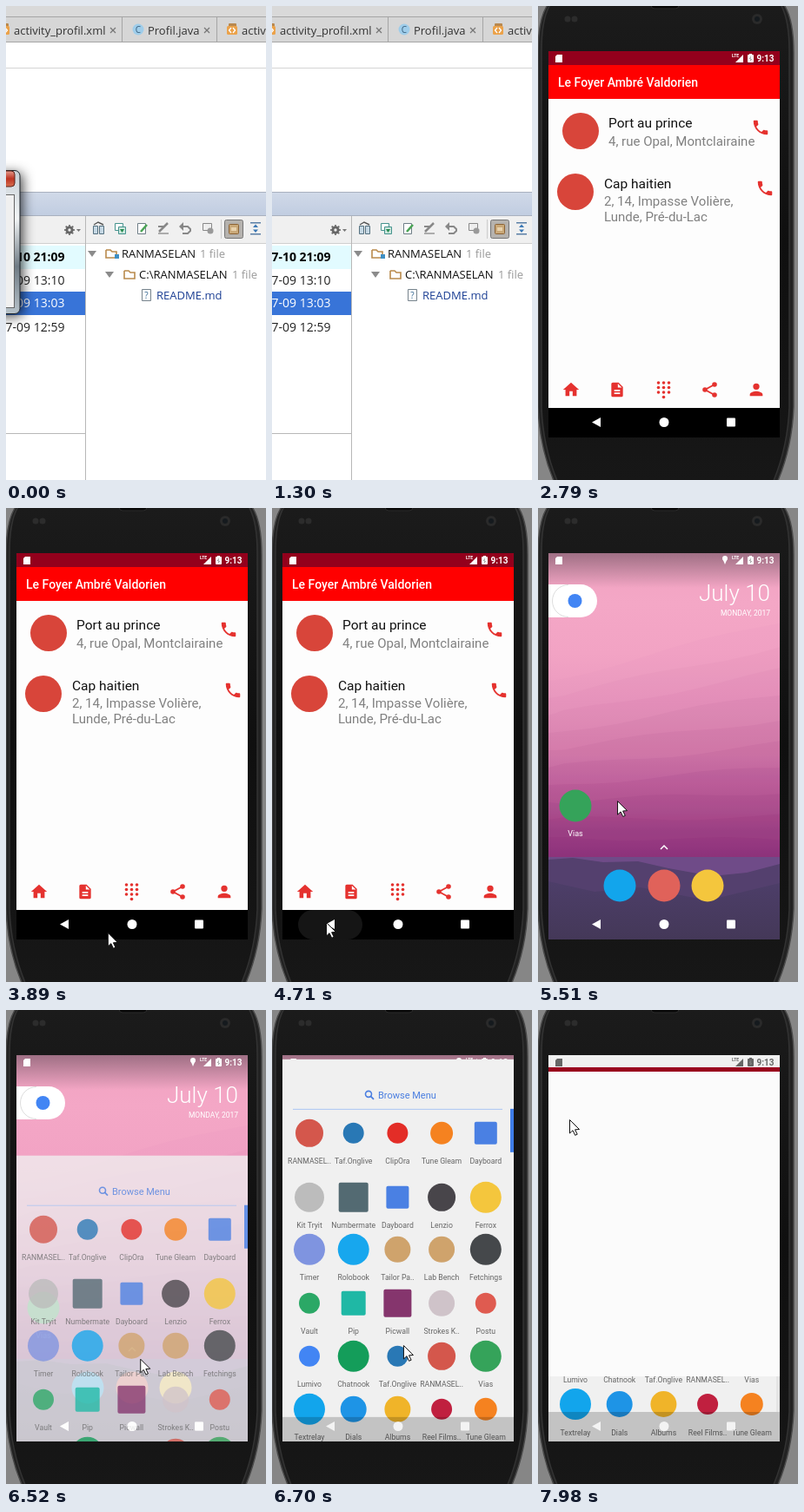
These frames come from a looping animation (299 px wide and 546 px high, 8 s). An HTML page with a canvas:

```html
<!DOCTYPE html>
<html lang="en">
<head>
<meta charset="utf-8">
<title>Screen recording</title>
<style>
  html, body { margin: 0; width: 100%; height: 100%; overflow: hidden; background: #fff; }
  canvas { display: block; }
</style>
</head>
<body>
<canvas id="stage" width="299" height="546"></canvas>
<script>
const g = document.getElementById('stage').getContext('2d');
const LOOP = 8000, STEP = 90.2;
const UI = '"Open Sans", "Noto Sans", sans-serif', MOBILE = 'Roboto, sans-serif';

// ---------- drawing helpers ----------
const rect = (x, y, w, h, c) => { g.fillStyle = c; g.fillRect(x, y, w, h); };
function disc(x, y, r, c) {
  g.fillStyle = c; g.beginPath(); g.arc(x, y, r, 0, 7); g.fill();
}
function round(x, y, w, h, r, fill, stroke) {
  g.beginPath(); g.roundRect(x, y, w, h, r);
  if (fill) { g.fillStyle = fill; g.fill(); }
  if (stroke) { g.strokeStyle = stroke; g.lineWidth = 1; g.stroke(); }
}
function trace(points) {
  g.beginPath();
  for (let i = 0; i < points.length; i += 2) g.lineTo(points[i], points[i + 1]);
}
function poly(points, c) { trace(points); g.fillStyle = c; g.fill(); }
function line(points, c, w = 1) { trace(points); g.strokeStyle = c; g.lineWidth = w; g.stroke(); }
function text(s, x, y, size, c, { font = MOBILE, weight = 400, align = 'left' } = {}) {
  g.font = `${weight} ${size}px ${font}`;
  g.textAlign = align; g.fillStyle = c; g.fillText(s, x, y);
}
function blend(x0, y0, x1, y1, ...colors) {
  const gr = g.createLinearGradient(x0, y0, x1, y1);
  colors.forEach((c, i) => gr.addColorStop(i / (colors.length - 1), c));
  return gr;
}
function layer(draw, { alpha = 1, x = 0, y = 0, scale = 1 } = {}) {
  g.save(); g.globalAlpha *= alpha; g.translate(x, y); g.scale(scale, scale);
  draw(); g.restore();
}
// Linear interpolation between rows of [time, ...values].
function track(t, rows) {
  const i = rows.findIndex(r => r[0] > t);
  if (i === 0) return rows[0].slice(1);
  if (i < 0) return rows[rows.length - 1].slice(1);
  const [a, b] = [rows[i - 1], rows[i]], p = (t - a[0]) / (b[0] - a[0]);
  return a.slice(1).map((v, k) => v + (b[k + 1] - v) * p);
}

const GLYPHS = {
  home: 'M10 20v-6h4v6h5v-8h3L12 3 2 12h3v8z',
  page: 'M14 2H6a2 2 0 0 0-2 2v16a2 2 0 0 0 2 2h12a2 2 0 0 0 2-2V8zM16 18H8v-2h8zM16 14H8v-2h8zM13 9V3.5L18.5 9z',
  person: 'M12 12a4 4 0 1 0 0-8 4 4 0 0 0 0 8zM12 14c-2.7 0-8 1.3-8 4v2h16v-2c0-2.7-5.3-4-8-4z',
  call: 'M6.6 10.8c1.4 2.8 3.8 5.1 6.6 6.6l2.2-2.2c.3-.3.7-.4 1-.2 1.1.4 2.3.6 3.6.6.6 0 1 .4 1 1V20c0 .6-.4 1-1 1C10.6 21 3 13.4 3 4c0-.6.4-1 1-1h3.5c.6 0 1 .4 1 1 0 1.2.2 2.4.6 3.6.1.3 0 .7-.2 1z'
};
for (const k in GLYPHS) GLYPHS[k] = new Path2D(GLYPHS[k]);
function glyph(name, x, y, size, c) {
  layer(() => { g.fillStyle = c; g.fill(GLYPHS[name], 'evenodd'); },
    { x: x - size / 2, y: y - size / 2, scale: size / 24 });
}
function cursor([x, y]) {
  layer(() => {
    const arrow = [.5, .5, .5, 16, 4, 12.7, 6.7, 18.3, 9.2, 17.2, 6.6, 11.8, 11.5, 11.5, .5, .5];
    poly(arrow, '#fff'); line(arrow, '#111');
  }, { x, y });
}

// ---------- desktop editor ----------
function folder(x, y) {
  line([x - 6, y - 4, x - 1, y - 4, x + 1, y - 2, x + 6, y - 2, x + 6, y + 5, x - 6, y + 5, x - 6, y - 4], '#b98a4c', 1.6);
}
function tab(x, w, label, labelX, isClass) {
  rect(x, 13, w, 28, '#d6d6d6');
  rect(x + w, 13, 1, 28, '#a5a5a5');
  if (isClass) {
    disc(labelX - 11, 27, 6.5, '#9fcdea');
    text('C', labelX - 11, 31, 10, '#3a617f', { font: UI, align: 'center' });
  } else {
    const left = labelX - 17;
    round(left + 2, 20, 9, 4, 1, '#b9884d');
    round(left, 23, 12, 10, 1.5, '#eba24a');
    line([left + 5, 25, left + 2.5, 28, left + 5, 31], '#fff', 1.3);
    line([left + 7, 25, left + 9.5, 28, left + 7, 31], '#fff', 1.3);
  }
  text(label, labelX, 33, 13, '#333', { font: UI });
}
function closeMark(x) {
  line([x - 3, 25, x + 3, 31], '#777', 1.3);
  line([x + 3, 25, x - 3, 31], '#777', 1.3);
}
function toolbar() {
  disc(73, 258, 4.5, '#666'); disc(73, 258, 1.7, '#eee');
  for (let i = 0; i < 8; i++) {
    const a = i * Math.PI / 4;
    disc(73 + 5 * Math.cos(a), 258 + 5 * Math.sin(a), 1.1, '#666');
  }
  poly([81, 257, 86, 257, 83.5, 260], '#777');
  round(100.5, 253.5, 5, 9, 0, '#c6d8e4', '#55707f');
  round(107.5, 253.5, 5, 9, 0, '#c6d8e4', '#55707f');
  line([101, 252, 106, 249, 112, 252], '#555', 1.4);
  round(125.5, 250.5, 9, 8, 0, '#fff', '#45938d');
  round(129.5, 254.5, 8, 8, 0, '#cde7de', '#45938d');
  poly([131, 257, 136, 257, 133.5, 261], '#258b4f');
  round(151.5, 250.5, 9, 12, 0, '#fff', '#6f7e87');
  line([155, 260, 162, 252], '#49a354', 2.5);
  line([176, 260, 186, 250], '#888', 2.5); line([175, 254, 181, 254], '#888', 2);
  line([175, 262, 187, 262], '#888', 1.3);
  line([202, 254, 209, 254, 212, 257, 212, 259, 209, 262, 203, 262], '#888', 2);
  poly([199, 254, 204, 249, 204, 259], '#888');
  round(226.5, 250.5, 10, 8, 0, '#eee', '#888'); disc(235, 259, 3.5, '#999');
  rect(247, 246, 1, 22, '#ccc');
  round(251.5, 246.5, 21, 21, 2, '#b5b2ae', '#757575');
  round(256.5, 251.5, 11, 11, 1, '#c9a878', '#8a6235');
  rect(259, 255, 6, 4, '#e8d2ad');
  rect(281, 249, 12, 1.5, '#5a7fa6'); rect(281, 262, 12, 1.5, '#5a7fa6');
  poly([284, 255, 290, 255, 287, 251.5], '#3b78b5');
  poly([284, 257.5, 290, 257.5, 287, 261], '#3b78b5');
}
function logRow(y, label, bg, c, weight) {
  rect(0, y, 91, 27, bg);
  text(label, 67.5, y + 18, 14, c, { font: UI, weight, align: 'right' });
}
function tree() {
  const entry = (s, x, y, c) => text(s, x, y, 13, c, { font: UI });
  poly([94, 282, 104, 282, 99, 289], '#8b8b8b'); folder(121, 285); rect(125, 286, 5, 5, '#3f8fc4');
  entry('RANMASELAN', 133, 290, '#111'); entry('1 file', 223, 290, '#999');
  poly([114, 306, 124, 306, 119, 313], '#8b8b8b'); folder(142, 309);
  entry('C:\\RANMASELAN', 153, 314, '#111'); entry('1 file', 260, 314, '#999');
  round(156.5, 326.5, 10, 13, 0, '#fff', '#76838c');
  text('?', 161.5, 337, 10, '#3a6b94', { font: UI, align: 'center' });
  entry('README.md', 173, 338, '#1c3f94');
}
function dialog() {
  g.save();
  g.shadowColor = 'rgba(0,0,0,.75)'; g.shadowBlur = 14; g.shadowOffsetY = 3; g.shadowOffsetX = 3;
  round(-40, 189.5, 56, 165, 6, '#aab4bd');
  g.restore();
  round(-40, 189.5, 56, 165, 6, blend(0, 190, 0, 355, '#c8d0d6', '#f2f5f6', '#6f7b85', '#b8c3ca'), '#20272c');
  round(-20, 190, 30, 18, 4, blend(0, 190, 0, 208, '#e49a8c', '#bd3423', '#d76f50'), '#5b2119');
  rect(-1, 217, 11, 131, '#666'); rect(0, 218, 9, 129, '#f0f0f0');
}
function editor(t, s) {
  rect(0, 0, 299, 546, '#fff');
  rect(0, 0, 299, 13, '#d9d9d9'); rect(0, 12, 299, 30, '#a5a5a5');
  tab(0, 133, 'activity_profil.xml', 9); closeMark(123);
  tab(134, 108, 'Profil.java', 163, true); closeMark(231);
  tab(243, 60, 'activity_main.xml', 271);
  rect(0, 71, 299, 1, '#d4d4d4');
  rect(0, 214, 299, 28, '#a9b1bf');
  rect(0, 215, 299, 26, blend(0, 215, 0, 241, '#d0d9e8', '#c1cde1'));
  rect(0, 242, 299, 31, '#f0f0f0'); rect(0, 273, 299, 1, '#cfcfcf');
  toolbar();
  logRow(276, '2017-07-10 21:09', '#e2fbff', '#000', 700);
  logRow(303, '2017-07-09 13:10', '#fff', '#222');
  logRow(329, '2017-07-09 13:03', '#3874d8', '#fff');
  logRow(357, '2017-07-09 12:59', '#fff', '#222');
  rect(0, 492, 91, 1, '#b8b8b8'); rect(91, 242, 1, 304, '#b8b8b8');
  tree();
  if (t < 670) {
    const p = t < 500 ? 0 : t < 590 ? 1 : 2;
    layer(dialog, { alpha: [1, .6, .2][p], x: -2 * p, y: 5 * p, scale: 1 - .02 * p });
  }
  if (t >= 850 && t < 1300) cursor(track(s, [[850, 68, 368], [1020, 87, 438], [1170, 87, 438], [1210, 78, 440]]));
}

// ---------- handset ----------
function shell(left, right, top, fill, stroke) {
  g.beginPath();
  g.moveTo(left + 13, top);
  g.quadraticCurveTo(left, top + 16, left, top + 58);
  g.lineTo(left, 462);
  g.quadraticCurveTo(left + 2, 515, left + 24, 560);
  g.lineTo(right - 24, 560);
  g.quadraticCurveTo(right - 2, 515, right, 462);
  g.lineTo(right, top + 58);
  g.quadraticCurveTo(right, top + 16, right - 13, top);
  g.fillStyle = fill; g.fill();
  g.strokeStyle = stroke; g.lineWidth = 1.5; g.stroke();
}
function handset() {
  rect(0, 0, 299, 546, '#868686');
  shell(0, 294, -4, '#222', '#4a4a4a');
  shell(4, 289, -6, blend(0, 0, 0, 546, '#1b1b1b', '#0f0f0f', '#171717'), '#333');
  round(130, -6, 32, 9, 4, '#080808', '#2a2a2a');
  disc(34, 15, 3.5, '#2c2c2c'); disc(42, 15, 3.5, '#2c2c2c');
  disc(252, 15, 6, '#2a2a2a'); disc(252, 15, 3, '#151a1e');
}
function statusBar(c, pin) {
  poly([22, 56, 28, 56, 28, 65, 20, 65, 20, 58], c);
  text('LTE', 223, 59, 5, c, { weight: 700 });
  poly([236, 56, 236, 65, 227, 65], c);
  round(241, 56, 7, 9, 1, c); rect(243, 55, 3, 2, c);
  poly([245, 57, 243, 61, 246, 61, 244, 64], '#888');
  text('9:13', 271.5, 64, 10, c, { weight: 700, align: 'right' });
  if (pin) { disc(215, 58, 3, c); poly([212.5, 59, 217.5, 59, 215, 65], c); }
}
function navKeys(c = '#fff') {
  poly([62, 479.5, 72, 474, 72, 485], c);
  disc(145, 479.5, 5.5, c);
  round(217, 474.5, 10, 10, 1, c);
}
function contactApp(t) {
  const red = '#e5322f';
  rect(12, 52, 266, 445, '#fdfdfd');
  rect(12, 52, 266, 16, '#93001c'); rect(12, 68, 266, 39, '#f00');
  statusBar('#fff');
  text('Le Foyer Ambré Valdorien', 23, 93, 14, '#fff', { weight: 500 });
  disc(49, 144, 21, '#d8453a'); disc(43, 214, 21, '#d8453a');
  text('Port au prince', 81, 140, 15.5, '#111');
  text('4, rue Opal, Montclairaine', 81, 161, 15, '#808080');
  text('Cap haitien', 76, 210, 15.5, '#111');
  text('2, 14, Impasse Volière,', 76, 230, 15, '#808080');
  text('Lunde, Pré-du-Lac', 76, 248, 15, '#808080');
  glyph('call', 256, 140, 22, red); glyph('call', 261, 210, 22, red);
  glyph('home', 38, 442, 22, red); glyph('page', 91, 442, 20, red); glyph('person', 251, 442, 22, red);
  for (let i = 0; i < 9; i++) disc(138.5 + i % 3 * 6, 434 + (i / 3 | 0) * 5.5, 1.8, red);
  disc(144.5, 450.5, 1.8, red);
  line([203, 436, 192, 442, 203, 448], red, 1.8);
  disc(203, 436, 2.8, red); disc(192, 442, 2.8, red); disc(203, 448, 2.8, red);
  rect(12, 463, 266, 34, '#000');
  if (t >= 4620) round(t < 4700 ? 45 : 30, 463, t < 4700 ? 44 : 74, 34, 17, '#151515');
  navKeys();
}
function wallpaper() {
  rect(12, 52, 266, 350, blend(0, 52, 0, 402, '#f0a2c0', '#f4a7c6', '#f2a3c4', '#e998be', '#de88b4', '#c66ba2', '#a04a8a'));
  for (let i = 0; i < 10; i++) {
    const y = 165 + 24 * i, tilt = 34 - 4 * i;
    const band = [12, y + tilt];
    for (let x = 30; x <= 278; x += 31) band.push(x, y + tilt * (145 - x) / 133 + 3 * Math.sin(x / 40 + i * 2));
    poly([...band, 278, 402, 12, 402], `rgba(115,25,105,${.015 + .009 * i})`);
  }
  rect(12, 402, 266, 95, '#6f4b88');
  poly([12, 405, 40, 403, 75, 408, 115, 407, 150, 415, 200, 424, 240, 420, 278, 410, 278, 497, 12, 497], '#54406e');
  poly([12, 430, 65, 442, 118, 437, 195, 452, 278, 432, 278, 497, 12, 497], blend(0, 430, 0, 497, '#4d3e69', '#443858'));
  rect(12, 52, 266, 40, blend(0, 52, 0, 92, 'rgba(60,50,60,.45)', 'rgba(60,50,60,0)'));
}
function launcher() {
  wallpaper();
  statusBar('#fff', true);
  round(-20, 88, 88, 38, 19, '#fff');
  g.beginPath(); g.arc(35, 107, 18.5, 1.57, 4.71); g.strokeStyle = '#ddd'; g.lineWidth = 1; g.stroke();
  disc(42.5, 107, 8, '#4285f4');
  text('July 10', 267, 107, 26, '#fff', { weight: 300, align: 'right' });
  text('MONDAY, 2017', 267, 124, 8.5, '#fff', { align: 'right' });
  disc(43, 343, 18.5, '#35a35a');
  text('Vias', 43, 378, 9, '#fff', { align: 'center' });
  line([141, 393, 145, 389, 149, 393], '#fff', 1.5);
  [[94, '#12a5ec'], [145, '#e0625a'], [195, '#f4c63d']].forEach(([x, c]) => disc(x, 435, 18.5, c));
  navKeys();
}

// label, colour, radius (negative: square)
const APPS = `RANMASEL..,#d4574c,16;Taf.Onglive,#2978b5,12;ClipOra,#e32d27,12;Tune Gleam,#f58220,13;Dayboard,#4a80e3,-13
Kit Tryit,#bcbcbc,17;Numbermate,#536a72,-17;Dayboard,#4a80e3,-13;Lenzio,#48454a,16;Ferrox,#f4c63d,18
Timer,#7f94e0,18;Rolobook,#17a7ee,18;Tailor Pa..,#cfa36c,15;Lab Bench,#cfa36c,15;Fetchings,#45484b,18
Vault,#2ba866,12;Pip,#1fb8a5,-14;Picwall,#85356d,-16;Strokes K..,#cfc3c9,15;Postu,#df5b50,12
Lumivo,#4285f4,12;Chatnook,#149d5a,18;Taf.Onglive,#2978b5,12;RANMASEL..,#d4574c,16;Vias,#35a35a,18
Textrelay,#12a5ec,18;Dials,#1e94e6,15;Albums,#f0b429,15;Reel Films..,#c0203f,12;Tune Gleam,#f58220,13`
  .split('\n').map(row => row.split(';').map(app => app.split(',')));
const ROW_Y = [142, 216, 276, 338, 399, 460];

function drawer(lift) {
  rect(12, 57, 266, 500, '#f0f0f0');
  g.beginPath(); g.arc(111, 97, 3.5, 0, 7); g.strokeStyle = '#4a7ee0'; g.lineWidth = 1.6; g.stroke();
  line([113.5, 99.5, 117, 103], '#4a7ee0', 1.8);
  text('Browse Menu', 122, 102, 11, '#4a7ee0');
  rect(24, 114, 241, 1, '#a9c4f2');
  if (lift > 0) rect(274, 114, 4, 50, '#3f7de8'); else rect(274, 120, 4, 349, '#e4e4e4');
  APPS.forEach((row, j) => row.forEach(([label, c, size], i) => {
    const x = 43 + 50.7 * i, y = ROW_Y[j], r = Math.abs(size);
    if (size < 0) round(x - r, y - r, 2 * r, 2 * r, 2, c); else disc(x, y, r, c);
    text(label, x, y + 35.5, 8.7, '#666', { align: 'center' });
  }));
  rect(12, 469, 266, 100, 'rgba(0,0,0,.19)');
}
function opening(t) {
  const p = t < 7810 ? .1 : t < 7890 ? .4 : t < 7970 ? .75 : 1;
  const mix = (a, b) => a + (b - a) * p;
  const x = mix(26, 12), y = mix(120, 66);
  rect(x, y, mix(60, 278) - x, mix(153, 422) - y, '#fbfbfb');
  rect(x, y, mix(60, 278) - x, 5 * p, '#99001d');
}
function mobile(t, s) {
  handset();
  g.save();
  g.beginPath(); g.rect(12, 52, 266, 445); g.clip();
  if (t < 4800) contactApp(t);
  else {
    launcher();
    const [out] = track(s, [[4780, 0], [5150, 1]]);
    if (out < 1) layer(() => contactApp(t), { alpha: (1 - out) ** 2, y: 90 * out });
  }
  if (t >= 6230) {
    const [lift, alpha] = track(s, [[6220, 345, .1], [6400, 230, .45], [6500, 110, .8], [6590, 30, 1], [6670, 6, 1], [6850, 0, 1]]);
    layer(() => drawer(lift), { alpha, y: lift - 6 });
    if (lift === 0) statusBar('#666');
    navKeys('rgba(255,255,255,.8)');
    if (t >= 7720) opening(t);
  }
  g.restore();
  if (t >= 3250 && t < 3350 || t >= 3530) cursor(track(s, [
    [3250, 44, 506], [3550, 44, 506], [3600, 101, 500], [3700, 101, 500], [3960, 124, 484],
    [4290, 42, 466], [4500, 62, 477], [4780, 62, 477], [5220, 97, 378], [5330, 97, 378],
    [5410, 92, 345], [5500, 91, 337], [5600, 93, 345], [6130, 166, 486], [6220, 166, 486],
    [6500, 154, 400], [6670, 151, 386], [6940, 146, 386], [7030, 110, 300], [7120, 67, 204],
    [7270, 67, 204], [7480, 36, 126]]));
}

function frame(now) {
  const t = now % LOOP, s = Math.floor(t / STEP) * STEP;
  if (t < 2790) editor(t, s); else mobile(t, s);
  requestAnimationFrame(frame);
}
requestAnimationFrame(frame);
</script>
</body>
</html>
```
